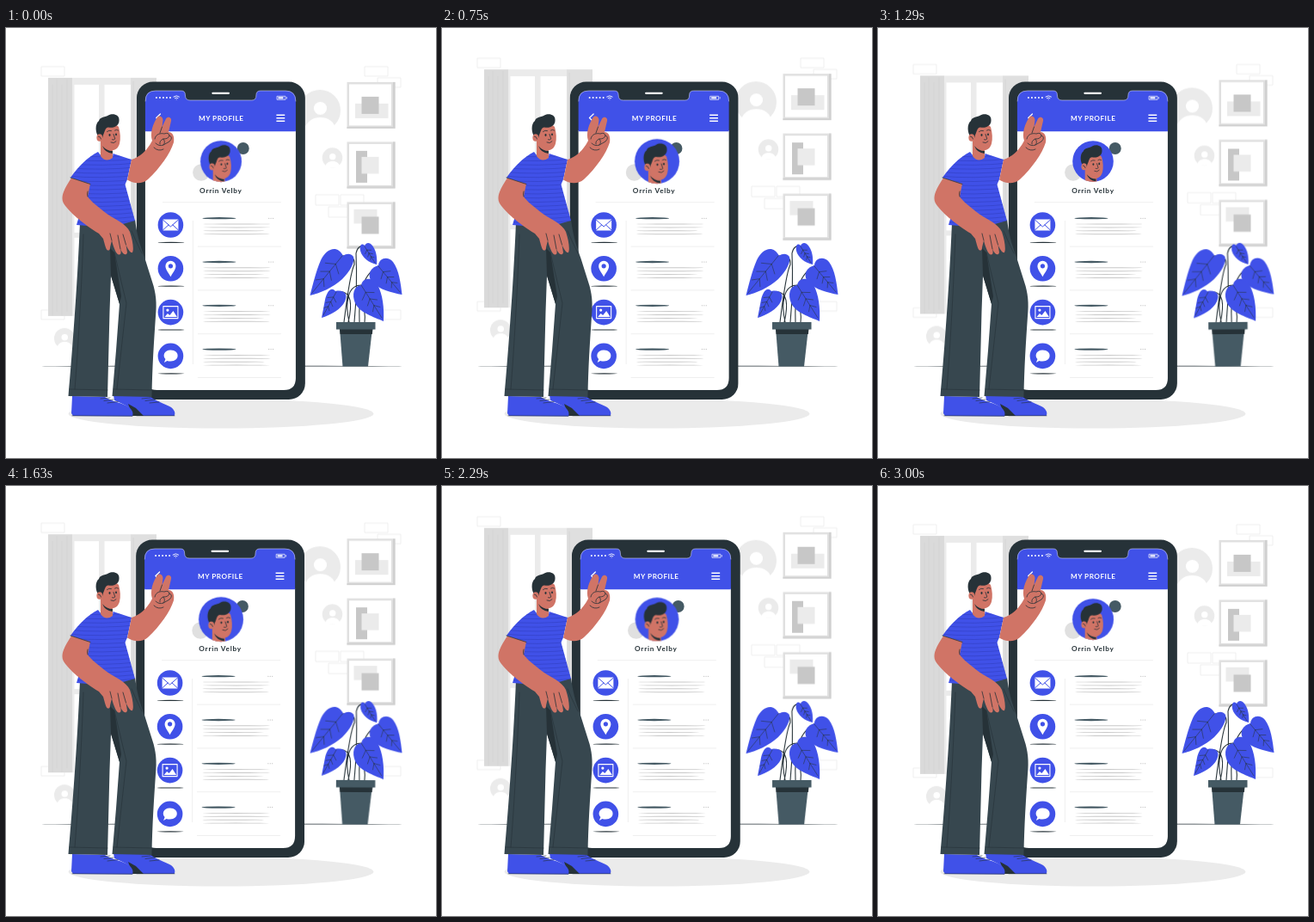
Recreate the animation shown at these times as an HTML page. Size 500x500 px, loop 3.04 s.

```html
<!DOCTYPE html>
<html lang="en">
<head>
<meta charset="utf-8">
<title>My profile</title>
<style>
  html, body { margin: 0; width: 100%; height: 100%; overflow: hidden; background: #fff; }
  svg { display: block; width: 100%; height: 100%; }
  text { font-family: Lato, "Open Sans", sans-serif; font-weight: 700; text-anchor: middle; }
  .blue { fill: #4051e8; }
  .dark { fill: #263238; }
  .slate { fill: #455a64; }
  .skin { fill: #d07466; }
  .pale { fill: #ebebeb; }
  .white { fill: #fff; }
  .line { fill: none; stroke: #263238; stroke-width: .8; stroke-linecap: round; stroke-linejoin: round; }
  .wline { fill: none; stroke: #fff; stroke-width: 1.5; stroke-linecap: round; stroke-linejoin: round; }
  .rule { fill: none; stroke: #ebebeb; stroke-width: .8; }

  #wall, #phone, #avatar, #plant {
    animation: 1500ms linear calc(var(--t, 0) * -1ms) infinite paused;
  }
  #wall { animation-name: float; }
  #phone { animation-name: shake; }
  #avatar { animation-name: beat; transform-origin: 250px 155px; }
  #plant { animation-name: wind; transform-origin: 407px 322px; }

  @keyframes float {
    0%, 100% { transform: translateY(0); }
    50% { transform: translateY(-10px); }
  }
  @keyframes shake {
    0%, 100% { transform: translateX(0); }
    10%, 90% { transform: translateX(-1px); }
    20%, 80% { transform: translateX(2px); }
    30%, 50%, 70% { transform: translateX(-4px); }
    40%, 60% { transform: translateX(4px); }
  }
  @keyframes beat {
    0%, 30%, 40%, 60%, 100% { transform: scale(1); }
    10%, 50% { transform: scale(1.1); }
  }
  @keyframes wind {
    0%, 100% { transform: rotate(0); }
    25% { transform: rotate(1deg); }
    75% { transform: rotate(-1deg); }
  }
</style>
</head>
<body>
<svg viewBox="0 0 500 500" xmlns="http://www.w3.org/2000/svg">
  <defs>
    <g id="head">
      <path class="skin" d="M110 130L110 149Q116 157 124 151L124 140Z"/>
      <path class="dark" d="M112 137Q117 143 124 143L123.800 146Q115 145 112 137Z"/>
      <path class="skin" d="M110 118C112 111 128 110 131 115C133 122 133.500 129 132 134.500C130 142 123 144.500 117 140C112 136 109 128 110 118Z"/>
      <path class="dark" d="M106.500 125C103.500 119 104 111 108 108C109 103 116 104 119 101.500C124 98.500 132 100.500 131.500 107C132 113 126 117 119 115.500C115 115.500 115 121 113 124.500L112 128C110 125 108 124 106.500 125Z"/>
      <ellipse class="skin" cx="108.800" cy="127.500" rx="3.400" ry="4.300"/>
      <path class="line" d="M107.500 126Q110 126 110.500 129"/>
      <ellipse class="dark" cx="120.500" cy="124.500" rx="1" ry="1.400"/>
      <ellipse class="dark" cx="128" cy="123.800" rx="1" ry="1.400"/>
      <path class="line" d="M117.500 120.500Q119.500 118.500 122.500 119.500M126.500 119Q128.500 117.500 130.500 119M125 123.500L126.800 129Q125.500 130.500 123.500 129.800M122 133Q125.500 135 128 131.800"/>
    </g>
    <g id="user">
      <circle class="pale" r="24"/>
      <circle class="white" cx=".5" cy="-2.500" r="7.600"/>
      <path class="white" d="M-17 24C-17 13 -9 8 .5 8S18 13 18 24Z"/>
    </g>
    <g id="frame">
      <path fill="#e0e0e0" d="M0 0H56V54H0Z"/>
      <path fill="#d0d0d0" d="M53.500 0H56V54H0V52H53.500Z"/>
      <path class="white" d="M2.500 2.500H51.500V50.500H2.500Z"/>
    </g>
    <path id="shirt" d="M107 144Q113 154 124 150L124.500 146L146 153L141 176L138.500 182L150 224L121 232L82 229L96 181L75 174C84 161 95 150 107 144Z"/>
    <clipPath id="shirtClip"><use href="#shirt"/></clipPath>
    <clipPath id="faceClip"><circle cx="250" cy="155" r="23.800"/></clipPath>
  </defs>

  <g id="wall">
    <path class="rule" d="M41 45h27v11h-27zM41 328h27v11h-27zM417 45h27v11h-27zM432 58h27v11h-27zM360 194h27v12h-27zM389 194h27v12h-27zM375 208h27v12h-27zM432 328h27v11h-27z"/>
    <path class="pale" d="M77 58H175V66H77ZM77 66H79.500V335H77ZM108 66H114.500V335H108ZM77 238H150V244H77Z"/>
    <path fill="#dadada" d="M49 58H77V335H49Z"/>
    <path fill="#dfdfdf" d="M145 58H175V335H145Z"/>
    <path stroke="#d2d2d2" stroke-width=".6" d="M54 66V335M59 60V330M65 66V335M71 60V330M148 62V335"/>
    <use href="#frame" x="396.500" y="63"/>
    <path class="pale" d="M406 88h38.500v17h-38.500z"/>
    <path fill="#c7c7c7" d="M413.500 80h20v20h-20z"/>
    <use href="#frame" x="396.500" y="132.500"/>
    <path fill="#c7c7c7" d="M407 143h13v37h-13z"/>
    <path class="pale" d="M413.500 150h20v19.500h-20z"/>
    <use href="#frame" x="396.500" y="202.500"/>
    <path class="pale" d="M404.500 211h27v16.500h-27z"/>
    <path fill="#c7c7c7" d="M413.500 219.500h20v20h-20z"/>
    <use href="#user" transform="translate(365 96)"/>
    <use href="#user" transform="translate(379.500 151) scale(.49)"/>
    <use href="#user" transform="translate(68 361) scale(.5)"/>
  </g>

  <ellipse class="dark" cx="251" cy="393.200" rx="210" ry=".45"/>
  <ellipse class="pale" cx="250" cy="448.500" rx="177.500" ry="17"/>

  <g id="phone">
    <rect class="dark" x="152" y="62.500" width="196" height="369.500" rx="19"/>
    <path class="white" d="M162 119H337V407Q337 421 323 421H176Q162 421 162 407Z"/>
    <path class="blue" d="M162 120.300V85Q162 73 174 73H204Q208.500 73 208.500 78Q208.500 84 214 84H286Q291 84 291 78Q291 73 296 73H325Q337 73 337 85V120.300Z"/>
    <path class="line" style="stroke:#c9cdfa;stroke-width:.6" d="M162.200 85Q162 73 174 73H204Q208.500 73 208.500 78Q208.500 84 214 84H286Q291 84 291 78Q291 73 296 73H325Q337 73 337 85"/>
    <path class="wline" style="stroke-width:2.200" d="M240.500 75.800H259"/>
    <path class="wline" style="stroke-width:2;stroke-dasharray:0 4" d="M175 81H191.500"/>
    <path class="wline" style="stroke-width:.9" d="M195 80Q198.300 77.500 201.500 80M196.500 81.600Q198.300 80.200 200 81.600M198.300 83v.1"/>
    <path class="wline" style="stroke-width:.7" d="M315.500 79.300h9.500v4h-9.500zM326.500 80.500v1.600"/>
    <path class="white" d="M316.500 80.300h6v2h-6z"/>
    <path class="wline" style="stroke-width:1.200" d="M179.500 100L174.800 104.500L179.500 109"/>
    <path class="wline" style="stroke-linecap:butt" d="M314.500 101.300h9.800M314.500 104.800h9.800M314.500 108.300h9.800"/>
    <text class="white" x="250.300" y="108.300" font-size="8.200" letter-spacing=".5">MY PROFILE</text>
    <circle cx="227" cy="168" r="9.800" fill="#e0e0e0"/>
    <circle class="slate" cx="275.800" cy="140" r="7"/>
    <text class="dark" x="250" y="192" font-size="8.200" letter-spacing=".75">Orrin Velby</text>
    <path class="rule" d="M182 202.700H320M217.500 224V391"/>
    <g id="rows"></g>
  </g>

  <g id="avatar">
    <circle class="blue" cx="250" cy="155" r="23.800"/>
    <g clip-path="url(#faceClip)">
      <path class="skin" d="M241 165L241 184H255L254 172Z"/>
      <use href="#head" transform="translate(139.500 44) scale(.92)"/>
    </g>
  </g>

  <g id="plant">
    <path class="line" style="stroke-width:1.100" d="M393 342C396 318 400 285 405 275Q406 263 391 265M405 342C408 310 408 285 407 262Q409 252 417 254M411 342C410 315 412 288 433 277M398 342C402 325 404 303 384 307M417 342C420 320 405 298 413 299M399 342C394 320 397 299 413 299"/>
    <g id="leaves"></g>
    <path class="slate" d="M388 349H426L421 393.500H391.500Z"/>
    <path class="dark" d="M388 350H426.500L425.800 356H388.600Z"/>
    <path class="slate" d="M384 342H429.500V350.500H384Z"/>
  </g>

  <g id="man">
    <path class="blue" d="M125 427L166 427C172 433 185 437 192 441C197 445 197 449 195.500 451H152C148 444 140 438 126 433Z"/>
    <path class="dark" d="M142 437L151 442L160 451H147Z"/>
    <path class="blue" d="M77 428L115 429C122 434 136 436 143 441C148 445 148 449 147 451.500L78 451L76 448Z"/>
    <path class="line" style="stroke-width:.6" d="M77 450.800L147 451.200M152 450.800H196M110 431l11 -1M114 433.500l11 -1.500M118 436l12 -1.500M158 431l10 -1M162 433.500l11 -1.500M167 436l11 -1"/>
    <path fill="#37474f" d="M86 226L121 231L150 223C153 245 157 255 161.500 268L170 295C174.500 308 175.500 320 174 335C172 365 170 395 169.500 429L123.500 428L128 375L132 321L122 288L120.500 330L118 429L72.500 428C76 390 83 300 86 226Z"/>
    <path class="dark" d="M121 256L126 261L134 312L132 321L122 288Z"/>
    <path class="line" style="stroke-width:.6" d="M90 240C88 300 84 370 80 420M74 420L118 421M125 420L169 421M126 261L140 320L129 420M146 236Q152 250 158 262"/>
    <use class="blue" href="#shirt"/>
    <g clip-path="url(#shirtClip)"><path id="stripes" class="line" style="stroke:#2632a0;stroke-width:.45;opacity:.75"/></g>
    <path class="skin" d="M76 174.500C69 185 63 195 66.500 203C72 213 90 228 108 239L113 245C115 252 116 257 118 258.500C120 259 121 258 121 255L123 247C125 255 128 263 131 263.500C134 264 134 261 133 257C136 264 140 265 141 261L139.500 252C142 258 145 262 147 261C149 257 147 246 144 237C140 228 128 223 118 216.500C107 208 99 202 95 196L98 181Z"/>
    <path class="line" d="M123 247L121 239M133 257L130 241M139.500 252L136 240M75 174L98 181.500M95 196Q94 193 95 190"/>
    <use href="#head"/>
    <path class="skin" d="M146 153C155 150 164 143 170 131C167 122 171 111 175.800 104C178 101 182.500 103 182.500 107L181.500 115L186 105.500C188 102 193 104 192 108L189 121C194 121 196 126 195 133C191 146 179 163 165 176C158 182 148 181 141 176.500Z"/>
    <path class="line" d="M173 129C174 123 180 122 184 123Q189 121 190 125Q189 129 183 129Q178 131 179 135M190 125Q195 127 190 132L183 136Q178 138 174 134M183 129Q186 133 183 136M181.500 115L179 122M172 139Q177 144 183 141"/>
  </g>
</svg>

<script>
  const byId = id => document.getElementById(id);
  const ellipse = (x, y, rx, ry, fill) =>
    `<ellipse cx="${x}" cy="${y}" rx="${rx}" ry="${ry}" fill="${fill}"/>`;

  // Icons are drawn around their own centre.
  const icons = [
    `<path class="white" d="M-9 -6.500H9V6.500H-9Z"/>
     <path class="line" style="stroke:#4051e8;stroke-width:1" d="M-9 -6L0 2L9 -6M-9 6L-2.500 0M9 6L2.500 0"/>`,
    `<path class="white" d="M0 9.500C-3 4 -6 1 -6 -3A6 6 0 0 1 6 -3C6 1 3 4 0 9.500Z"/>
     <circle class="blue" cy="-3" r="2.600"/>`,
    `<path class="wline" style="stroke-width:1.100" d="M-8.500 -7H8.500V7H-8.500Z"/>
     <path class="white" d="M-7 5.500L-3.500 1.500L-1 3.500L3 -1.500L7.500 5.500Z"/>
     <circle class="white" cx="-3.500" cy="-2.500" r="1.600"/>`,
    `<path class="white" d="M-7.500 7.500L-6 3.500C-9.500 0 -8 -7 0 -7C11 -7 11 6 0 6Q-2.500 6 -4 5.500Z"/>`
  ];

  byId('rows').innerHTML = icons.map((icon, i) => {
    const y = 229 + 50.8 * i;
    const dots = [305.8, 308.2, 310.6].map(x => ellipse(x, y - 7.8, .6, .5, '#b0b0b0'));
    const copy = [79, 79, 72, 78].map((w, n) =>
      ellipse(229 + w / 2, y - 1 + 3.9 * n, w / 2, .5, '#c7c7c7'));
    return `<g transform="translate(191.5 ${y})"><circle class="blue" r="14.8"/>${icon}</g>` +
      ellipse(192, y + 20.4, 15.5, .6, '#263238') +
      ellipse(248, y - 7.8, 19.5, 1.15, '#455a64') +
      dots.join('') + copy.join('') +
      `<path class="rule" d="M223 ${y + 25.1}H320"/>`;
  }).join('');

  // Outline, base x and y, tip x and y
  const leaves = [
    ['M392 265C385 251 372 257 366 270C360 284 357 298 353.500 311C366 308 380 302 391 292C400 283 406 272 404 266C401 262 396 262 392 265Z', 391, 265, 356, 308],
    ['M417 253C413 249.500 411 253 412 259C414 267 422 273 431 275C432 266 430 258 426 253C423 249 419 249 417 253Z', 417, 254, 429, 273],
    ['M433 276C434 267 444 265 450 272C457 281 459 297 460.500 310C449 308 434 304 426 296C420 289 422 279 433 276Z', 433, 277, 458, 307],
    ['M383 306C378 300 373 307 371 316L367 337C377 334 390 327 394 318C398 310 394 304 383 306Z', 384, 307, 369, 334],
    ['M413 299C415 290 426 289 432 299C438 309 440 326 439 341C428 336 411 331 406 320C402 310 404 300 413 299Z', 413, 299, 437, 337]
  ];

  function veins(x, y, tx, ty) {
    const dx = tx - x, dy = ty - y;
    let d = `M${x} ${y}L${tx} ${ty}`;
    for (const p of [.22, .42, .62]) {
      for (const side of [-1, 1]) {
        const reach = .22 * (1 - p * .8);
        d += `M${x + dx * p} ${y + dy * p}l${dx * .12 - side * dy * reach} ${dy * .12 + side * dx * reach}`;
      }
    }
    return d;
  }

  byId('leaves').innerHTML = leaves.map(([d, ...axis]) =>
    `<path class="blue" d="${d}"/><path class="line" style="stroke-width:.55" d="${veins(...axis)}"/>`).join('');

  byId('stripes').setAttribute('d', Array.from({ length: 19 }, (_, i) =>
    `M70 ${148 + i * 4.8}Q112 ${152 + i * 4.8} 155 ${147 + i * 4.8}`).join(''));

  // Poses advance at 24 per second; the last one repeats the first.
  const LOOP = 3040, STEP = 1000 / 24, LEAD = 12;
  const start = performance.now();

  function draw() {
    const t = Math.max(0, performance.now() - start) % LOOP;
    const pose = Math.floor((t + 4) / STEP) % 72;
    document.documentElement.style.setProperty('--t', (pose * STEP + LEAD).toFixed(2));
    requestAnimationFrame(draw);
  }
  draw();
</script>
</body>
</html>
```
